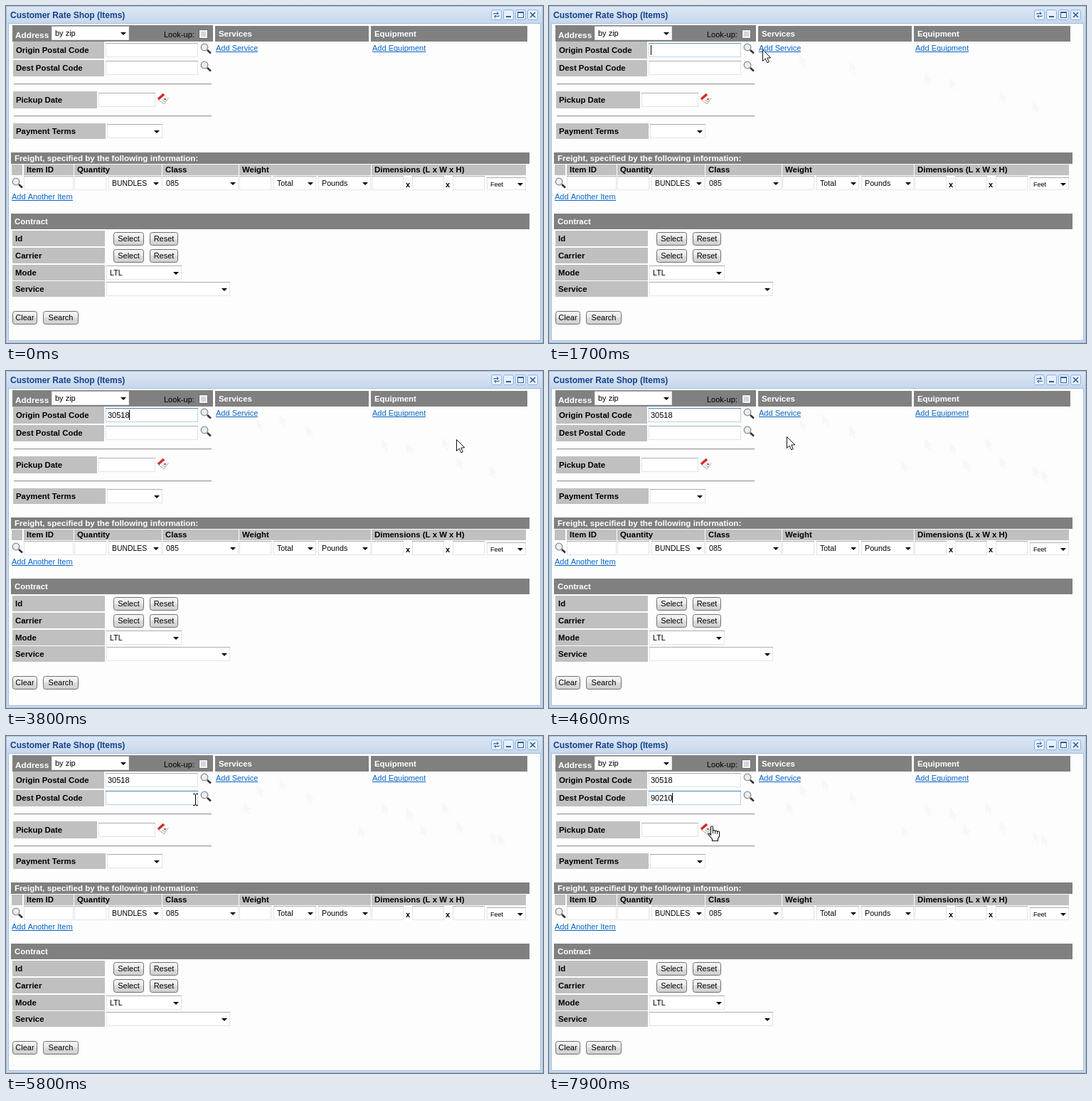
Recreate the animation shown at these times as an HTML page with a canvas. Size 755x474 px, loop 8000 ms.

```html
<!DOCTYPE html>
<html lang="en">
<head>
<meta charset="utf-8">
<title>Rate form</title>
<style>
html, body { margin: 0; width: 100%; height: 100%; overflow: hidden; background: #cad9ec; }
canvas { display: block; }
</style>
</head>
<body>
<canvas id="stage" width="755" height="474"></canvas>
<script>
const ctx = document.getElementById('stage').getContext('2d');
const LOOP = 8000;
const FAMILY = '"Liberation Sans", Arial, sans-serif';

// Pointer stops: time, x, y, shape, leaves a faint trail
const STOPS = [
  [700, 743, 152, 'arrow'], [800, 680, 133, 'arrow', 1], [900, 633, 119, 'arrow', 1],
  [1000, 563, 100, 'arrow', 1], [1100, 528, 94, 'arrow', 1], [1200, 422, 77, 'arrow', 1],
  [1300, 352, 67, 'arrow', 1], [1400, 262, 62, 'beam'], [1700, 300, 61, 'arrow'],
  [1800, 384, 60, 'arrow', 1], [1900, 520, 82, 'arrow'], [2000, 613, 93, 'arrow', 1],
  [2100, 633, 96, 'arrow'], [4100, 660, 115, 'arrow'], [4200, 692, 138, 'arrow', 1],
  [4300, 582, 123, 'arrow', 1], [4400, 495, 125, 'arrow', 1], [4500, 415, 110, 'arrow'],
  [4600, 334, 92, 'arrow', 1], [4700, 296, 87, 'arrow'], [4800, 268, 88, 'beam'],
  [4900, 266, 89, 'beam'], [7500, 268, 92, 'beam'], [7600, 295, 104, 'arrow'],
  [7700, 281, 116, 'arrow'], [7800, 251, 124, 'arrow'], [7900, 229, 127, 'hand']
];

const FIELDS = [
  { y: 52, text: '30518', keys: [2900, 2900, 3200, 3400, 3800],
    focus: 1500, blur: 5000, caret: [[1600, 2400], [2900, 4100]] },
  { y: 77, text: '90210', keys: [5900, 6000, 6300, 6700, 6800],
    focus: 5000, blur: Infinity, caret: [[5200, 5800], [5900, 7300], [7800, LOOP]] }
];

function rect(x, y, w, h, color) {
  ctx.fillStyle = color;
  ctx.fillRect(x, y, w, h);
}

function text(str, x, y, color = '#000', size = 11, weight = '') {
  ctx.font = `${weight} ${size}px ${FAMILY}`;
  ctx.fillStyle = color;
  ctx.fillText(str, x, y);
  return ctx.measureText(str).width;
}

const bold = (str, x, y, color = '#000', size = 11.4) => text(str, x, y, color, size, 'bold');

function link(str, x, y) {
  const width = text(str, x, y, '#0563c9');
  rect(x, y + 1, Math.round(width), 1, '#0563c9');
}

function path(points, closed = true) {
  ctx.beginPath();
  points.forEach(([x, y]) => ctx.lineTo(x, y));
  if (closed) ctx.closePath();
}

function line(points, color, width = 1) {
  path(points, false);
  ctx.strokeStyle = color;
  ctx.lineWidth = width;
  ctx.stroke();
}

function label(str, x, y, w, h, base) {
  rect(x, y, w, h, '#c0c0c0');
  bold(str, x + 4, base);
}

function header(str, x, y, w, h, base, size) {
  rect(x, y, w, h, '#808080');
  bold(str, x + 5, base, '#fff', size);
}

function input(x, y, w, h = 20, focus = 0) {
  rect(x, y, w, h, '#e1e4ea');
  rect(x, y, w, 1, '#abadb3');
  if (focus) {
    ctx.globalAlpha = focus;
    rect(x, y, w, h, '#b2d3eb');
    rect(x, y, w, 1, '#4b86b4');
    ctx.globalAlpha = 1;
  }
  rect(x + 1, y + 1, w - 2, h - 2, '#fff');
}

function select(x, y, w, value = '', size = 10.7, h = 20) {
  input(x, y, w, h);
  text(value, x + 5, y + h / 2 + 4, '#000', size);
  const ax = x + w - 12, ay = y + Math.floor(h / 2) - 1;
  ctx.fillStyle = '#000';
  path([[ax, ay], [ax + 8, ay], [ax + 4, ay + 4]]);
  ctx.fill();
}

function button(str, x, y, w) {
  const fill = ctx.createLinearGradient(0, y, 0, y + 19);
  fill.addColorStop(0, '#f4f4f4');
  fill.addColorStop(.5, '#ebebeb');
  fill.addColorStop(.5, '#dddddd');
  fill.addColorStop(1, '#cfcfcf');
  ctx.beginPath();
  ctx.roundRect(x + .5, y + .5, w - 1, 18, 3);
  ctx.fillStyle = fill;
  ctx.fill();
  ctx.strokeStyle = '#707070';
  ctx.lineWidth = 1;
  ctx.stroke();
  ctx.textAlign = 'center';
  text(str, x + w / 2, y + 13);
  ctx.textAlign = 'left';
}

function magnifier(x, y) {
  line([[x + 4, y + 4], [x + 9, y + 8.5]], '#333', 2.6);
  ctx.beginPath();
  ctx.arc(x, y, 4.8, 0, Math.PI * 2);
  ctx.fillStyle = '#e9eef2';
  ctx.fill();
  ctx.strokeStyle = '#8b8b8b';
  ctx.lineWidth = 1.3;
  ctx.stroke();
}

function calendar(x, y) {
  ctx.save();
  ctx.translate(x, y);
  ctx.rotate(.65);
  rect(-5, -5, 11, 11, '#b9b9b9');
  rect(-5, -5, 10, 10, '#fafafa');
  ctx.restore();
  line([[x - 7, y + 1], [x + 1, y - 6]], '#cf2a2a', 3.5);
  line([[x - 2, y + 2], [x + 3, y + 5]], '#b0b0b0');
  rect(x + 1, y, 3, 2, '#d84a43');
}

function rule(y) {
  rect(11, y, 278, 1, '#9a9a9a');
  rect(11, y + 1, 278, 1, '#e6e6e6');
}

function windowTools() {
  const ink = '#2c5c9e';
  for (let i = 0; i < 4; i++) {
    const x = 682 + i * 17;
    ctx.beginPath();
    ctx.roundRect(x + .5, 5.5, 14, 14, 2.5);
    ctx.fillStyle = '#e6f0fc';
    ctx.fill();
    ctx.strokeStyle = '#8fb3df';
    ctx.lineWidth = 1;
    ctx.stroke();
  }
  line([[686, 12], [686, 10.5], [692, 10.5]], ink);
  line([[690, 8], [692.5, 10.5], [690, 12]], ink);
  line([[693, 13], [693, 14.5], [687, 14.5]], ink);
  line([[689, 12.5], [686.5, 14.5], [689, 17]], ink);
  rect(703, 14, 7, 2, ink);
  ctx.strokeRect(719.5, 8.5, 8, 8);
  rect(719, 8, 9, 2, ink);
  line([[737, 9], [744, 16]], ink, 1.6);
  line([[744, 9], [737, 16]], ink, 1.6);
}

function drawWindow() {
  const bar = ctx.createLinearGradient(0, 0, 0, 25);
  bar.addColorStop(0, '#dce7f5');
  bar.addColorStop(1, '#c6d7ec');
  rect(0, 0, 755, 474, '#cad9ec');
  rect(0, 0, 755, 25, bar);
  ctx.strokeStyle = '#a5bfe0';
  ctx.lineWidth = 1;
  ctx.strokeRect(.5, .5, 754, 473);
  rect(3, 24, 749, 447, '#a5bfe0');
  rect(4, 25, 747, 445, '#fdfdfd');
  bold('Customer Rate Shop (Items)', 6, 17, '#15428b', 12);
  windowTools();
}

function drawAddress() {
  rect(9, 27, 282, 23, '#808080');
  bold('Address', 13, 45, '#fff', 11.8);
  select(64, 28, 109, 'by zip', 11);
  text('Look-up:', 222, 44);
  rect(271, 33, 13, 13, '#6f6f6f');
  rect(272, 34, 11, 11, '#f4f4f4');
  rect(274, 36, 7, 7, '#d4d7da');
  header('Services', 294, 28, 216, 22, 43);
  header('Equipment', 513, 28, 220, 22, 43);
  link('Add Service', 295, 63);
  link('Add Equipment', 515, 63);
  label('Origin Postal Code', 10, 50, 128, 24, 66);
  label('Dest Postal Code', 10, 76, 128, 23, 91);
  magnifier(279, 58);
  magnifier(279, 83);
  rule(109);
  label('Pickup Date', 10, 120, 118, 24, 136);
  input(130, 122, 80);
  calendar(221, 130);
  rule(154);
  label('Payment Terms', 10, 165, 130, 22, 180);
  select(142, 166, 78);
}

function drawFreight() {
  header('Freight, specified by the following information:', 7, 206, 729, 16, 218, 11.6);
  rect(8, 223, 15, 15, '#c0c0c0');
  [['Item ID', 25, 70], ['Quantity', 96, 123], ['Class', 220, 107],
   ['Weight', 328, 185], ['Dimensions (L x W x H)', 514, 217]]
    .forEach(([name, x, w]) => label(name, x, 223, w, 15, 234));
  magnifier(14, 247);
  [[25, 70], [96, 45], [328, 45], [514, 45], [571, 45], [628, 45]]
    .forEach(([x, w]) => input(x, 239, w));
  select(144, 239, 75, 'BUNDLES', 10.4);
  select(220, 239, 107, '085');
  select(376, 239, 60, 'Total');
  select(439, 239, 74, 'Pounds');
  select(676, 241, 55, 'Feet', 9, 18);
  bold('x', 562, 255, '#000', 11);
  bold('x', 618, 255, '#000', 11);
  link('Add Another Item', 8, 272);
}

function drawContract() {
  header('Contract', 7, 292, 729, 22, 307);
  rect(7, 292, 1, 22, '#808080');
  ['Id', 'Carrier', 'Mode', 'Service'].forEach((name, i) => {
    const y = 316 + i * 24 - (i === 3 ? 1 : 0);
    label(name, 9, y, 130, 22, y + 15);
  });
  for (const y of [318, 342]) {
    button('Select', 151, y, 43);
    button('Reset', 202, y, 40);
  }
  select(141, 365, 106, 'LTL');
  select(141, 388, 174);
  button('Clear', 9, 429, 35);
  button('Search', 52, 429, 50);
}

function drawField(field, t) {
  const ramp = start => Math.min(1, Math.max(0, (t - start + 100) / 400));
  input(140, field.y, 130, 20, ramp(field.focus) - ramp(field.blur));
  const typed = field.text.slice(0, field.keys.filter(k => k <= t).length);
  text(typed, 143, field.y + 14);
  if (field.caret.some(([on, off]) => t >= on && t < off)) {
    rect(143 + typed.length * 6, field.y + 3, 1, 14, '#000');
  }
}

function arrowPath(x, y) {
  path([[0, 0], [0, 16], [3.7, 12.6], [6.3, 18.3], [8.8, 17.2], [6.3, 11.6], [11.2, 11.3]]
    .map(([dx, dy]) => [x + .5 + dx, y + .5 + dy]));
}

function drawTrail(x, y) {
  arrowPath(x, y);
  ctx.fillStyle = 'rgba(0, 0, 0, .022)';
  ctx.fill();
}

const POINTERS = {
  arrow(x, y) {
    arrowPath(x, y);
    ctx.fillStyle = '#fff';
    ctx.fill();
    ctx.strokeStyle = '#111';
    ctx.lineWidth = 1;
    ctx.stroke();
  },
  beam(x, y) {
    rect(x, y - 7, 1, 15, '#000');
    for (const dy of [-8, 8]) {
      rect(x - 3, y + dy, 3, 1, '#000');
      rect(x + 1, y + dy, 3, 1, '#000');
    }
  },
  hand(x, y) {
    ctx.save();
    ctx.translate(x, y);
    ctx.beginPath();
    ctx.moveTo(-1.5, 12);
    ctx.lineTo(-1.5, 1);
    ctx.quadraticCurveTo(0, -1.5, 1.5, 1);
    ctx.lineTo(1.5, 6);
    for (const k of [0, 1, 2]) {
      const right = 4.5 + k * 3;
      ctx.quadraticCurveTo(right - .3, 4.5 + k * .8, right, 7 + k * .7);
    }
    ctx.lineTo(10.5, 14);
    ctx.lineTo(8.5, 17.5);
    ctx.lineTo(8.5, 20.5);
    ctx.lineTo(.5, 20.5);
    ctx.lineTo(.5, 18);
    ctx.lineTo(-5, 11.5);
    ctx.quadraticCurveTo(-5, 8.5, -1.5, 12);
    ctx.closePath();
    ctx.fillStyle = '#fff';
    ctx.fill();
    ctx.strokeStyle = '#111';
    ctx.lineWidth = 1.1;
    ctx.stroke();
    line([[1.5, 6], [1.5, 10]], '#111');
    line([[4.5, 7], [4.5, 10.5]], '#111');
    line([[7.5, 7.7], [7.5, 11]], '#111');
    ctx.restore();
  }
};

function draw(t) {
  drawWindow();
  drawAddress();
  drawFreight();
  drawContract();
  FIELDS.forEach(field => drawField(field, t));
  const passed = STOPS.filter(([time]) => time <= t);
  const current = passed.pop();
  for (const [, x, y, , trail] of passed) if (trail) drawTrail(x, y);
  if (current) {
    const [, x, y, shape] = current;
    POINTERS[shape](x, y);
  }
}

let start;
function tick(now) {
  start ??= now;
  draw((now - start) % LOOP);
  requestAnimationFrame(tick);
}
draw(0);
requestAnimationFrame(tick);
</script>
</body>
</html>
```
